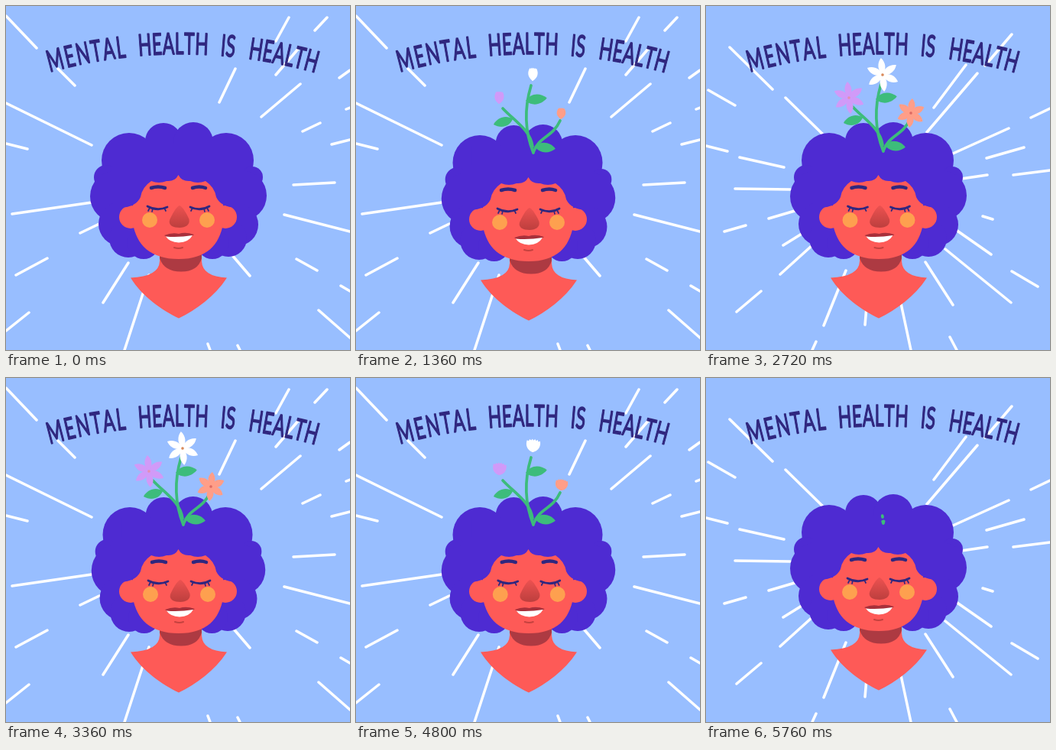
Animation of 450x450 px, one loop 5.84 s. Source, as an HTML page with a canvas:

```html
<!DOCTYPE html>
<html lang="en">
<head>
<meta charset="utf-8">
<title>Mental health is health</title>
<style>
  html, body { margin: 0; width: 100%; height: 100%; overflow: hidden; background: #98beff; }
  canvas { display: block; }
</style>
</head>
<body>
<canvas id="stage" width="450" height="450"></canvas>
<script>
const ctx = document.getElementById('stage').getContext('2d');
const LOOP = 5840, STEP = 80, TAU = Math.PI * 2;
const INK = '#30277f', HAIR = '#4e2bd2', SKIN = '#fe5a57', GREEN = '#3dbc7b';

const raysFar = new Path2D(`M0 13L40 55M68 82L90 104M0 127L112 182M0 180L28 187M8 272L112 257
  M97 297L122 285M13 352L54 330M0 425L30 401M127 388L160 336M155 450L187 352M295 325L319 353
  M264 442L267 450M303 444L306 450M409 398L450 434M380 331L407 346M438 366L450 373M364 273L450 295
  M376 234L430 231M426 181L450 175M388 164L411 153M334 145L385 102M279 126L300 82M436 94L450 84
  M445 135L450 133M353 46L370 15M404 32L420 15M353 90L384 54`);
const raysNear = new Path2D(`M31 54L87 109M104 120L152 167M3 110L38 130M0 183L28 190M44 198L102 211
  M38 239L110 240M24 295L52 287M82 278L116 268M101 313L130 295M97 351L139 313M40 400L72 373
  M154 418L183 346M139 450L144 439M208 417L212 370M268 450L252 375M319 433L328 450M287 335L323 391
  M313 318L399 388M400 347L434 367M320 288L373 325M362 275L375 279M402 221L450 215M334 226L368 221
  M367 199L416 185M323 193L396 160M425 146L450 134M289 165L355 88M298 133L340 77M365 78L400 37`);

const curls = [[206, 177, 24], [245, 178, 26], [161, 202, 36], [288, 202, 36], [131, 224, 16],
  [322, 224, 14], [144, 249, 34], [308, 248, 33], [150, 285, 29], [302, 286, 28],
  [160, 304, 25], [291, 304, 24], [180, 310, 21], [270, 310, 21]];

// stem path, its length, centre, petal size, colours, tilt
const flowers = [
  { stem: 'M232 190C220 160 220 132 229 102', length: 91, x: 231, y: 90, size: 22, color: '#fff', dot: '#d98a5a', tilt: -.1 },
  { stem: 'M231 182C228 160 208 149 192 132', length: 66, x: 187, y: 120, size: 21, color: '#d19af8', dot: '#e58fb0', tilt: -.1 },
  { stem: 'M232 189C240 168 257 170 267 148', length: 57, x: 268, y: 140, size: 19, color: '#ff9e88', dot: '#dd6a62', tilt: .1 }
].map(f => ({ ...f, stem: new Path2D(f.stem) }));

// base, angle, length, growth at which it sprouts
const leaves = [[222, 122, -.13, 28, .65], [205, 146, 2.87, 26, .7], [234, 182, .1, 27, .25]];

const words = [['MENTAL', 107, 1.8], ['HEALTH', 219, .2], ['IS', 289.5, .2], ['HEALTH', 361, .2]];

const ramp = (t, from, to) => Math.min(1, Math.max(0, (t - from) / (to - from)));

function fill(path, color) {
  ctx.fillStyle = color;
  ctx.fill(new Path2D(path));
}
function stroke(path, color, width) {
  ctx.strokeStyle = color;
  ctx.lineWidth = width;
  ctx.stroke(typeof path === 'string' ? new Path2D(path) : path);
}
function disc(x, y, r, color) {
  ctx.fillStyle = color;
  ctx.beginPath();
  ctx.arc(x, y, r, 0, TAU);
  ctx.fill();
}

function drawTitle() {
  const radius = 640, narrow = .59;
  ctx.font = '400 39px Lato, "Open Sans", sans-serif';
  ctx.textAlign = 'center';
  ctx.fillStyle = ctx.strokeStyle = INK;
  ctx.lineWidth = 1.6;
  for (const [word, x, tracking] of words) {
    const widths = [...word].map(c => ctx.measureText(c).width * narrow + tracking);
    let along = -widths.reduce((a, b) => a + b) / 2;
    [...word].forEach((letter, i) => {
      ctx.save();
      ctx.translate(229.5, 63 + radius);
      ctx.rotate(Math.asin((x - 229.5) / radius) + (along + widths[i] / 2) / radius);
      ctx.scale(narrow, 1);
      ctx.fillText(letter, 0, -radius);
      ctx.strokeText(letter, 0, -radius);
      ctx.restore();
      along += widths[i];
    });
  }
}

function drawWoman(low, turn) {
  ctx.save();
  ctx.translate(0, low ? 3 : 0);

  ctx.save();
  ctx.translate(226, 0);
  ctx.scale(low ? .985 : 1, 1);
  ctx.translate(-226, 0);
  for (const c of curls) disc(...c, HAIR);
  fill('M150 180H300V285H150Z', HAIR);
  ctx.restore();

  fill('M201 318V334Q200 354 163 355.500C178 380 204 398 226 408.500C248 398 273 380 289 355.500Q257 354 256 334V318Z', SKIN);
  fill('M201 322V330Q207 347.500 229 347.500Q251 347.500 256 330V322Z', '#ad3a42');
  disc(163, 276, 15, SKIN);
  disc(287, 276, 15, SKIN);
  fill('M166 215V285C171 312 188 331 226 331C263 331 279 312 284 285V215Z', SKIN);
  fill(`M140 205V264H150Q170 263 176 250Q178 237 190 229Q200 233 210 229Q221 230 225.500 221
    Q230 230 241 229Q251 233 261 229Q273 237 275 250Q281 263 301 264H311V205Z`, HAIR);

  ctx.translate(turn, 0);
  disc(188, 280, 10, '#fea04f');
  disc(263, 280, 10, '#fea04f');

  const shade = ctx.createLinearGradient(0, 260, 0, 288);
  shade.addColorStop(0, '#ee5251');
  shade.addColorStop(1, '#c0403f');
  fill('M227 261C231 262 237 273 239.500 279C241 286 235 290 227 290C219 290 212 287 214 280C217 273 223 262 227 261Z', shade);

  stroke('M190 238Q199 235 208 238M244 238Q253 235 261 238', INK, 4.500);
  stroke('M185 262Q198 269 211 263M241 263Q254 269 266 262', INK, 2.800);
  stroke('M188 264L186 268M192 265L191 269M207 264L209 268M244 264L242 268M259 265L260 269M263 264L265 268', INK, 1.700);

  fill('M207 300Q217 296 226 298Q235 295 246 299Q242 303 226 304Q212 304 207 300Z', '#a8303b');
  fill('M209 301.500Q226 303 244 300Q239 309 226 309.500Q214 309 209 301.500Z', '#fff');
  stroke('M220 316Q226 318 231 316', '#c5423f', 2);
  ctx.restore();
}

function drawFlower(f, bud, bloom) {
  ctx.save();
  ctx.translate(f.x, f.y + 6 * (1 - bloom));
  ctx.rotate(f.tilt * bloom);
  ctx.scale(bud, bud);
  ctx.fillStyle = f.color;
  const length = f.size * (.75 + .25 * bloom), half = 5 + bloom;
  for (let i = -2; i <= 3; i++) {
    ctx.save();
    ctx.rotate(i * (.05 + (TAU / 6 - .05) * bloom));
    ctx.beginPath();
    ctx.moveTo(0, 0);
    ctx.bezierCurveTo(-half, -length * .3, -half, -length * .7, 0, -length);
    ctx.bezierCurveTo(half, -length * .7, half, -length * .3, 0, 0);
    ctx.fill();
    ctx.restore();
  }
  if (bloom > .5) disc(0, 0, 1.8, f.dot);
  ctx.restore();
}

function drawPlant(grow, bud, bloom) {
  if (grow <= 0) return;
  for (const f of flowers) {
    ctx.setLineDash([f.length * grow, 200]);
    stroke(f.stem, GREEN, 3.700);
  }
  ctx.setLineDash([]);
  for (const [x, y, angle, length, start] of leaves) {
    const size = ramp(grow, start, start + .3) * length;
    ctx.save();
    ctx.translate(x, y);
    ctx.rotate(angle);
    ctx.scale(size, size);
    fill('M0 0C.25 -.32 .7 -.32 1 0C.7 .3 .25 .3 0 0Z', GREEN);
    ctx.restore();
  }
  if (bud > 0) for (const f of flowers) drawFlower(f, bud, bloom);
}

function draw(t) {
  const beat = t % 500;
  const low = beat >= 270;
  const near = beat >= 20 && beat < 270;
  const span = (a, b, c, d) => ramp(t, a, b) - ramp(t, c, d);

  ctx.fillStyle = '#98beff';
  ctx.fillRect(0, 0, 450, 450);
  ctx.lineCap = ctx.lineJoin = 'round';
  stroke(near ? raysNear : raysFar, '#fff', 3.500);
  drawTitle();
  drawWoman(low, 1.500 * span(2100, 4000, 4400, 5200));

  ctx.save();
  ctx.translate(0, low ? 2 : 0);
  drawPlant(span(100, 820, 5060, 5780), span(820, 1020, 4860, 5060), span(1340, 1700, 4480, 4860));
  ctx.restore();
}

function tick() {
  const t = performance.now() % LOOP;
  draw(Math.floor(t / STEP) * STEP);
  requestAnimationFrame(tick);
}
tick();
</script>
</body>
</html>
```
